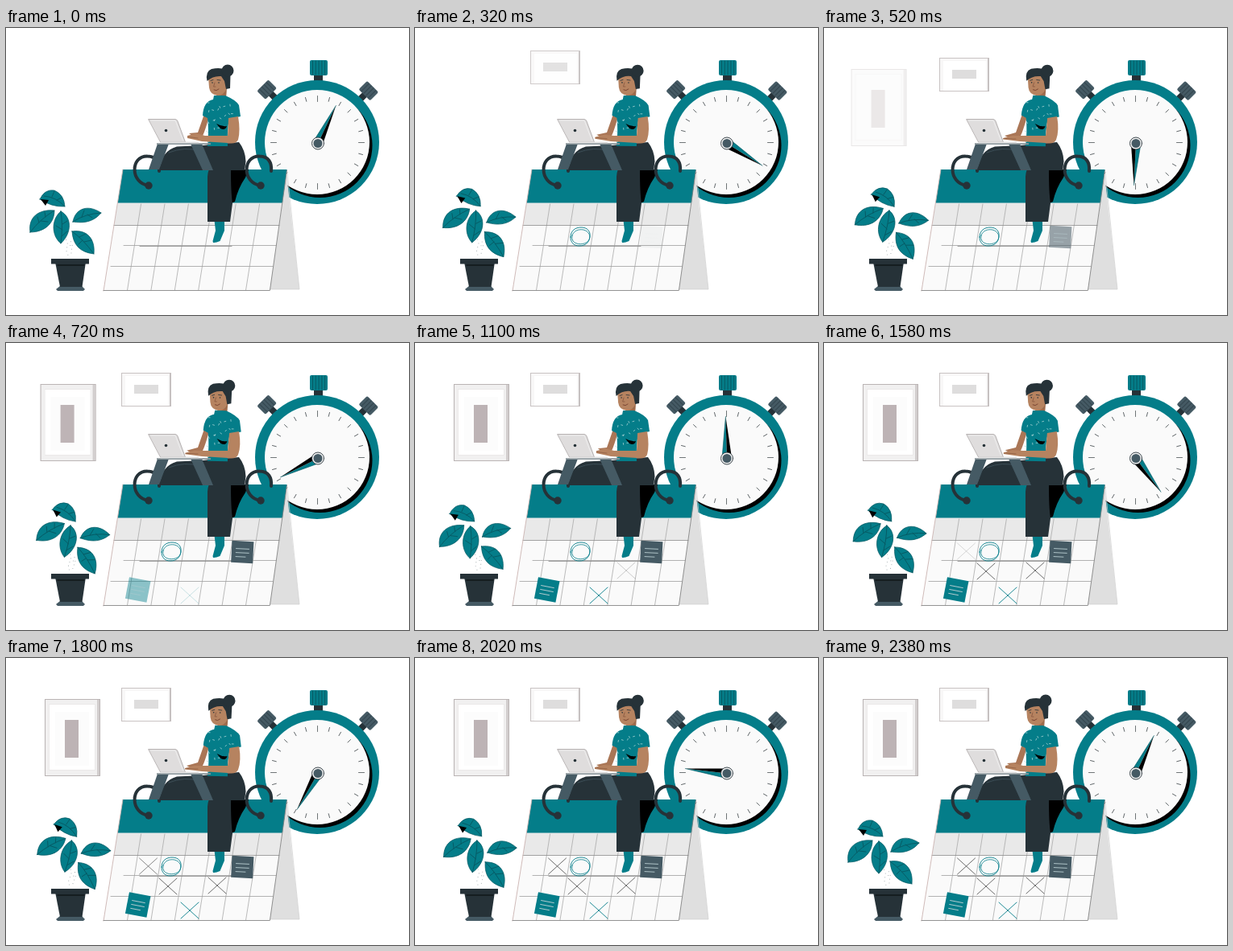
Animation, 500 px wide and 357 px high, one loop 2400 ms. Source, as an HTML page with a canvas:

```html
<!DOCTYPE html>
<html lang="en">
<head>
<meta charset="utf-8">
<title>Planning time</title>
<style>
html, body { margin: 0; width: 100%; height: 100%; overflow: hidden; background: #fff; }
canvas { display: block; width: 500px; height: 357px; }
</style>
</head>
<body>
<canvas id="stage" width="500" height="357"></canvas>
<script>
const ctx = document.getElementById('stage').getContext('2d');
const LOOP = 2400, STEP = 20, SPAN = LOOP - STEP;
const TEAL = '#047d89', DEEP = '#075963', DARK = '#263238', SLATE = '#455a64';
const SKIN = '#b68360', BLACK = '#000', INK = '#5c5c5c';

const ramp = (t, from, to) => Math.min(1, Math.max(0, (t - from) / (to - from)));

function shape(d, fill, stroke, width = 1) {
  const path = new Path2D(d);
  if (fill) { ctx.fillStyle = fill; ctx.fill(path); }
  if (stroke) { ctx.strokeStyle = stroke; ctx.lineWidth = width; ctx.stroke(path); }
}

function disc(x, y, r, fill, stroke, width = 1) {
  ctx.beginPath();
  ctx.arc(x, y, r, 0, Math.PI * 2);
  if (fill) { ctx.fillStyle = fill; ctx.fill(); }
  if (stroke) { ctx.strokeStyle = stroke; ctx.lineWidth = width; ctx.stroke(); }
}

function box(x, y, w, h, fill, stroke) {
  ctx.fillStyle = fill;
  ctx.fillRect(x, y, w, h);
  if (stroke) {
    ctx.strokeStyle = stroke;
    ctx.lineWidth = 1;
    ctx.strokeRect(x + .5, y + .5, w - 1, h - 1);
  }
}

function line(x1, y1, x2, y2, color, width = 1) {
  ctx.beginPath();
  ctx.moveTo(x1, y1);
  ctx.lineTo(x2, y2);
  ctx.strokeStyle = color;
  ctx.lineWidth = width;
  ctx.stroke();
}

function placed(x, y, angle, draw) {
  ctx.save();
  ctx.translate(x, y);
  ctx.rotate(angle);
  draw();
  ctx.restore();
}

function faded(alpha, draw) {
  if (alpha <= 0) return;
  ctx.save();
  ctx.globalAlpha = alpha;
  draw();
  ctx.restore();
}

// Wall frames slide into place while fading in.
function wallFrames(t) {
  const small = ramp(t, 120, 520), large = ramp(t, 440, 840);
  faded(Math.min(1, small * 1.7), () => placed(0, -18 * (1 - small), 0, () => {
    box(143, 37, 62, 42, '#f8f7f7', '#c9c3c3');
    box(203, 38, 2, 41, '#c6c1c1');
    box(148, 41, 53, 37, '#fff');
    box(159, 52, 30, 11, '#dedddd');
  }));
  faded(Math.min(1, large * 1.4), () => placed(-18 * (1 - large), 0, 0, () => {
    box(48, 51, 69, 96, '#f1f0f0', '#bab4b4');
    box(113, 52, 3, 94, '#d2cece');
    box(53, 57, 58, 83, '#fff', '#ebe9e9');
    box(61, 67, 42, 67, '#fcfcfc');
    box(73, 77, 17, 47, '#bdb3b5');
  }));
}

function sideButton(x, y, angle) {
  placed(x, y, angle, () => {
    box(-4, 5, 8, 10, DARK);
    shape('M-8,-8H8Q10,-8 10,-6V5Q10,7 8,7H-8Q-10,7 -10,5V-6Q-10,-8 -8,-8Z', SLATE);
    for (let i = -6; i <= 6; i += 4) line(i, -7, i, 6, '#33454e');
  });
}

function stopwatch(t) {
  sideButton(324, 77, -Math.PI / 4);
  sideButton(449.5, 78.5, Math.PI / 4);
  box(382, 57, 11, 11, DARK);
  shape('M379,40H397Q399,40 399,42V57Q399,59 397,59H379Q377,59 377,57V42Q377,40 379,40Z', TEAL);
  for (let x = 380.5; x < 398; x += 3.8) line(x, 41, x, 58, DEEP);
  disc(386, 142, 77, TEAL);
  disc(389.5, 146, 65, BLACK);
  disc(386, 142, 65, '#fafafa');
  for (let i = 0; i < 24; i++) {
    placed(386.5, 142.5, i * Math.PI / 12, () => line(0, i % 6 ? -53 : -51, 0, -58, '#4c5356', .8));
  }
  const degrees = 25.5 + 720 * t / SPAN;
  placed(387, 143.5, degrees * Math.PI / 180, () => {
    shape('M0,-52L-5.5,-5L0,-5Z', TEAL);
    shape('M0,-52L5.5,-5L0,-5Z', BLACK);
    shape('M0,-52L-5.5,-5', null, DEEP, .6);
  });
  disc(387, 143.5, 7.5, '#f3f3f3', DARK, .9);
  disc(387, 143.5, 5.5, SLATE);
}

function cross(x, y, color, alpha) {
  faded(alpha, () => {
    line(x - 11, y - 10, x + 11, y + 10, color, .9);
    line(x + 11, y - 10, x - 11, y + 10, color, .9);
  });
}

function note(x, y, angle, color, alpha) {
  faded(alpha, () => placed(x, y, angle, () => {
    box(-13.5, -13.5, 27, 27, color);
    [-4, 1, 6].forEach((dy, i) => line(-8, dy, i === 2 ? 4 : 8, dy, '#b9cdd1', .9));
  }));
}

const edgeX = y => 145 - (y - 176) * 24 / 151;

function calendar(t) {
  shape('M348,181L364,325H327Z', '#dfdfdf');
  shape('M349,181L364,325H327', null, '#cfcfcf', .7);
  shape('M138.5,217H343L327,327H121Z', '#fafafa');
  shape('M138.5,217H343L339,245H134Z', '#e9e9e9');
  shape('M145,176H348.5L343,217.5H138.5Z', TEAL);
  for (let i = 1; i < 7; i++) {
    const dx = i * 29.4;
    line(edgeX(219) + dx, 219, edgeX(326) + dx, 326, '#aaa', .8);
  }
  line(134, 245.5, 339, 245.5, '#8c8c8c', .8);
  line(146, 270.5, 335, 270.5, '#a0a0a0', .8);
  line(166, 271.5, 280, 271.5, '#8a8a8a', .8);
  line(130, 296.5, 331, 296.5, '#a0a0a0', .8);
  line(145, 176, 121, 327, '#cbb4b2', .9);
  line(348.5, 177, 327.5, 326, '#858585', .9);
  line(121, 326.5, 327, 326.5, '#888', .9);

  faded(ramp(t, 60, 260), () => {
    shape('M193,260C193,252 199,248 206,248C214,248 218,253 217,260C216,267 211,271 204,271C197,271 193,267 193,260Z', null, TEAL, .9);
    shape('M195,258C197,252 203,250 209,251C216,253 219,259 215,265C210,270 200,270 196,265Q194,262 195,258Z', null, TEAL, .8);
  });
  note(293.3, 260, .05, SLATE, ramp(t, 300, 700));
  note(163.7, 307, .19, TEAL, ramp(t, 540, 940));
  cross(228, 314, TEAL, ramp(t, 640, 1000));
  cross(262, 283, INK, ramp(t, 960, 1360));
  cross(201, 284, INK, ramp(t, 1200, 1560));
  cross(176.5, 259, INK, ramp(t, 1480, 1880));
}

function ring(dx) {
  placed(dx, 0, 0, () => {
    shape('M316,196C293,193 293,159 314.5,159.5C326,159.5 330,168 329,178', null, DARK, 4);
    disc(316, 196, 4.7, DARK);
  });
}

function upperBody(sway) {
  placed(265, 146, .022 * sway, () => {
    ctx.translate(-265, -146);
    shape('M262,74H274L273,89L261,88Z', '#9d6b4c');
    shape('M258,84L272,84Q286,90 289,96L291,110L277,113Q274,128 275,147H250Q252,128 250,112L244,109Q245,91 257,89Z', TEAL);
    // Scattered sprigs on the blouse.
    for (let i = 0; i < 24; i++) {
      const x = 250 + (i * 13.7) % 34, y = 93 + (i * 7.3) % 49;
      if (y < 110 || x < 272) line(x, y, x + 2 * Math.cos(i * 2), y + 2 * Math.sin(i * 2), '#a7d4d5', .8);
    }
    shape('M261,119Q268,123 274,122Q272,128 266,125Z', BLACK);
    shape('M251,61L273,58L274,75Q270,84 263,84Q253,83 252,74Z', SKIN);
    shape('M249.5,66Q247,54 255,51Q272,47 278.5,58L278,75L273,76L271,66L267,60Q257,59 249.5,66Z', DARK);
    disc(275, 53, 7.5, DARK);
    disc(256, 68, .8, DARK);
    disc(264, 68, .8, DARK);
    shape('M254,65.5L257,64.5M262,64.5L266,65', null, DARK, .8);
    shape('M259,68L257.5,73L260,73', null, '#80503a', .7);
    shape('M258,77Q261,79 264,76', null, '#74402f', .9);
  });
}

function woman(sway) {
  shape('M191,177Q192,153 212,147.5L264,145L266,177Z', DARK);
  shape('M202,155Q222,147 240,153', null, SLATE, .7);
  shape('M258.5,239H271V252L265.5,265Q260,267.5 257,267L256.5,265L260,252Z', TEAL);
  shape('M279,176H301L297,186Q288,199 284,216L277,219Z', BLACK);
  shape('M246,146L289,142Q297,152 297.5,166L296,177H279Q279,205 281,218L278,241H250V185Q250,175 258,171Z', DARK);
  const hx = -3 * sway, hy = 3 * sway;
  shape(`M246,107L252,110Q247,128 244,134L${234 + hx},${136 + hy / 2}L${227 + hx},${131 + hy}L238,130Z`, '#aa7656');
  upperBody(sway);
  const ax = 1.2 * sway;
  shape(`M${276 + ax},112L${288 + ax},110Q${291 + ax},128 288,139Q285,145 275,143L243,141L${225 + hx},${137 + hy / 2}L${225 + hx},${134 + hy}L${236 + hx},${131 + hy}L247,134L275,134Z`, SKIN);
  line(226 + hx, 135.5 + hy * .7, 238, 137 + hy / 3, '#8c5b40', .7);
}

function desk() {
  shape('M188,144H202L190,176H177Z', SLATE);
  shape('M229,144H243L257,177H244Z', SLATE);
  box(187, 143.2, 67, 1.8, '#8b969b');
  shape('M177,113.5H210Q212,113.5 213,116L222.5,142H192Z', '#dfdddd', '#a8a2a2', .8);
  shape('M180,115H210L219.5,140', null, '#f2f2f2', .8);
  box(192, 141.5, 47, 1.7, '#e4e4e4');
  disc(198.5, 127.5, 1.8, DARK);
}

function leaf(outline, veins) {
  shape(outline, TEAL, DEEP, .7);
  shape(veins, null, DEEP, .9);
}

function plant(sway) {
  placed(79, 290, .215 * sway, () => {
    ctx.translate(-79, -290);
    leaf('M42,213Q48,200 60,202Q72,207 73,222Q57,223 42,213Z', 'M47,209Q62,210 73,222M57,210L60,203M63,214L69,211');
    shape('M43,213L53,214L49,221Z', BLACK);
    leaf('M30,254C27,236 40,225 60,227C60,243 48,254 30,254Z', 'M30,254Q42,238 60,227M41,242L39,235M43,240L52,241M49,235L48,229');
    leaf('M68,228C82,235 82,255 68,268C56,258 56,238 68,228Z', 'M68,228Q71,246 68,268M70,244L76,240M70,251L62,246M69,259L76,253');
    leaf('M83,241C86,224 102,219 118,230C108,242 95,243 83,241Z', 'M83,241Q98,231 118,230M94,235L97,227M101,232L107,236');
    leaf('M82,253C100,250 111,262 109,281C92,279 83,270 82,253Z', 'M82,253Q96,263 109,281M91,260L99,256M97,266L106,264M95,264L90,269');
    for (let i = 0; i < 10; i++) {
      box(74 + (i * 5.3) % 10, 263 + (i * 7.1) % 19, .9, .9, '#9aa4a7');
    }
  });
  shape('M67,321H94L98,325L96,327H64L62,325Z', SLATE);
  shape('M61,291H99L94.5,322H67Z', DARK);
  line(64, 295, 97, 295, '#101719', 1.5);
  box(56, 287, 47, 6.5, DARK);
}

function draw(t) {
  const sway = (1 - Math.cos(4 * Math.PI * t / SPAN)) / 2;
  ctx.fillStyle = '#fff';
  ctx.fillRect(0, 0, 500, 357);
  ctx.lineCap = 'round';
  wallFrames(t);
  stopwatch(t);
  calendar(t);
  ring(-139);
  woman(sway);
  desk();
  ring(0);
  plant(sway);
}

const start = performance.now();
function tick() {
  const t = (performance.now() - start) % LOOP;
  draw(Math.floor(t / STEP) * STEP);
  requestAnimationFrame(tick);
}
tick();
</script>
</body>
</html>
```
